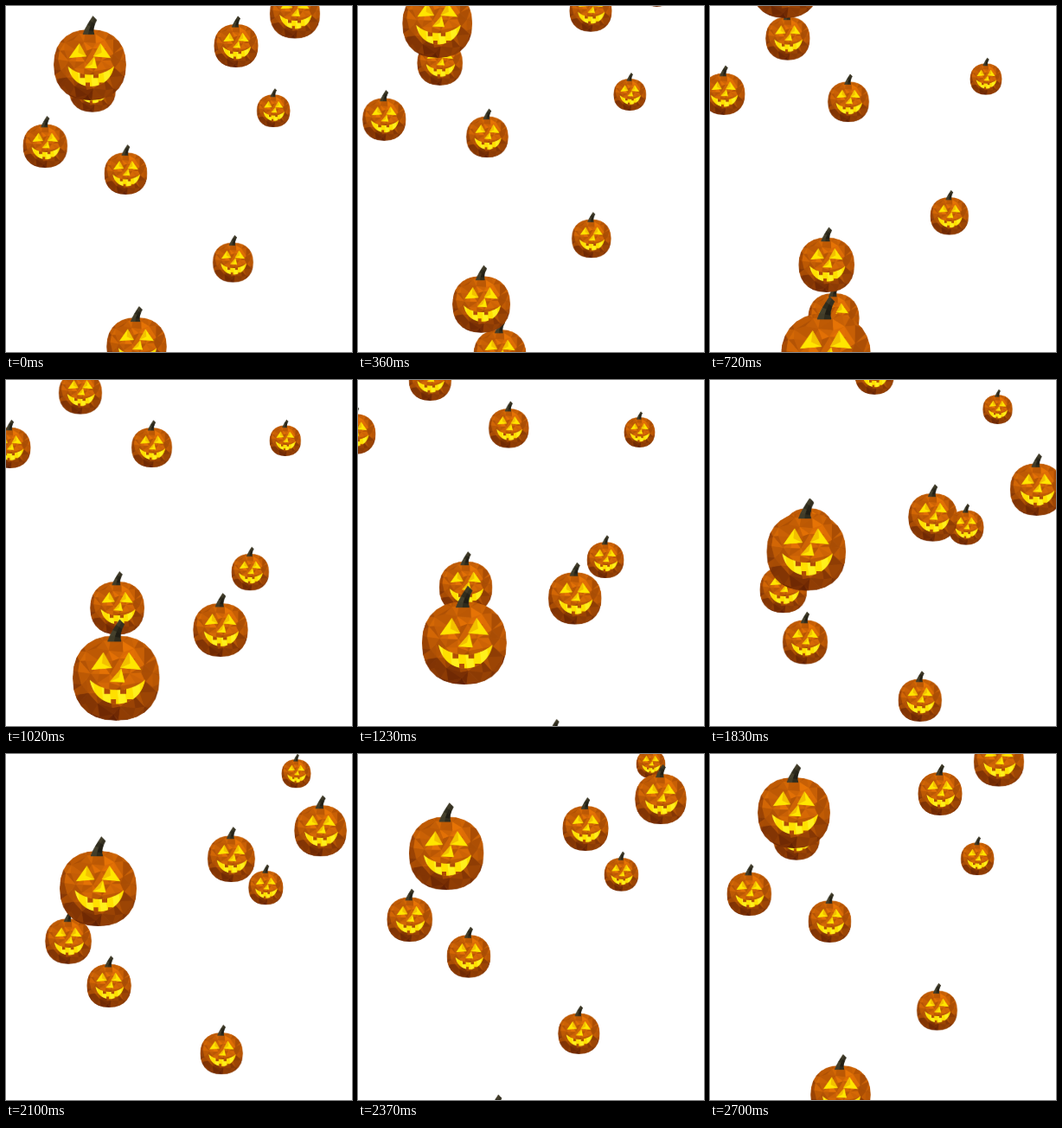
These frames come from a looping animation (400 by 400 pixels, 2.73 s). An HTML page with a canvas:

```html
<!DOCTYPE html>
<html lang="en">
<head>
<meta charset="utf-8">
<title>Rising pumpkins</title>
<style>
html, body { margin: 0; width: 100%; height: 100%; overflow: hidden; background: #fff; }
canvas { display: block; width: 400px; height: 400px; }
</style>
</head>
<body>
<canvas id="stage" width="400" height="400"></canvas>
<script>
const LOOP = 2730, CYCLE = 2700, STEP = 30;
const ctx = document.getElementById('stage').getContext('2d');
ctx.imageSmoothingQuality = 'high';

// A flight runs through two key poses; it may appear at a given time.
const pose = (t, x, y, w) => ({ t, x, y, w });
const flight = (a, b, from = -CYCLE) => ({ a, b, from });
const flights = [
  flight(pose(0, 151, 394, 68), pose(3720, 86, 15, 49)),
  flight(pose(720, 134, 406, 102), pose(2700, 97, 68, 82)),
  flight(pose(720, 143, 361, 58), pose(4140, -11, 47, 46)),
  flight(pose(1830, 110, 303, 51), pose(4140, 180, 34, 45), 1640),
  flight(pose(1440, 233, 407, 51), pose(6840, 328, 51, 34.5)),
  flight(pose(1020, 248, 289, 62), pose(2700, 266, 46, 50), 870),
  flight(pose(1440, 399, 184, 62), pose(2700, 334, 9, 57), 1260)
];

// Straight motion seen in perspective: size falls as 1 / depth.
function poseAt({ a, b }, t) {
  const u = (t - a.t) / (b.t - a.t);
  const ratio = a.w / b.w;
  const depth = 1 + (ratio - 1) * u;
  const s = ratio * u / depth;
  return { x: a.x + (b.x - a.x) * s, y: a.y + (b.y - a.y) * s, w: a.w / depth };
}

// Sprite in units where the body is about 100 wide, centred on the origin.
const SIZE = 320, SCALE = 2;
const sprite = document.createElement('canvas');
sprite.width = sprite.height = SIZE;
const pen = sprite.getContext('2d');
pen.translate(SIZE / 2, SIZE / 2);
pen.scale(SCALE, SCALE);
pen.lineJoin = 'round';

function noise(n) {
  const v = Math.sin(n * 12.9898 + 4.1) * 43758.5453;
  return v - Math.floor(v);
}

function trace(points) {
  pen.beginPath();
  for (const [x, y] of points) pen.lineTo(x, y);
  pen.closePath();
}

function poly(color, points) {
  trace(points);
  pen.fillStyle = pen.strokeStyle = color;
  pen.lineWidth = 0.5;
  pen.fill();
  pen.stroke();
}

const centre = points => [0, 1].map(i => points.reduce((sum, p) => sum + p[i], 0) / points.length);

function skin([x, y], n) {
  const fall = Math.max(0, (y + 10) / 60);
  const light = 0.84 - 0.62 * fall ** 1.5 - 0.2 * (x / 50) ** 2 + (noise(n) - 0.5) * 0.34;
  const k = Math.max(0, Math.min(1, light));
  const mix = (lo, hi) => Math.round(lo + (hi - lo) * k);
  return `rgb(${mix(78, 232)},${mix(20, 116)},${mix(3, 5)})`;
}

function drawBody() {
  const curve = v => Math.sign(v) * Math.abs(v) ** 0.88;
  const rim = Array.from({ length: 28 }, (_, i) => {
    const a = i / 28 * Math.PI * 2;
    return [51 * curve(Math.cos(a)), 50 * curve(Math.sin(a))];
  });
  pen.save();
  trace(rim);
  pen.clip();
  const n = 9, cell = 116 / n;
  const node = (c, r) => {
    const seed = c * 17 + r * 31;
    return [c * cell - 58 + (noise(seed) - 0.5) * 9, r * cell - 58 + (noise(seed + 5) - 0.5) * 9];
  };
  for (let r = 0; r < n; r++) {
    for (let c = 0; c < n; c++) {
      const quad = [node(c, r), node(c + 1, r), node(c + 1, r + 1), node(c, r + 1)];
      const odd = (r + c) % 2;
      for (const half of [0, 2]) {
        const facet = [0, 1, 2].map(i => quad[(i + half + odd) % 4]);
        poly(skin(centre(facet), 200 + (r * n + c) * 2 + half / 2), facet);
      }
    }
  }
  pen.restore();
}

// Tapered stem that bends to the right; each segment has a lit and a dark side.
function drawStem() {
  const parts = 4;
  const across = (s, side) => {
    const half = side * (4 + 4 * (1 - s) ** 2);
    const tilt = s * 0.8;
    return [-2 + 9 * s ** 1.6 + half * Math.cos(tilt), -43 - 23 * s + half * Math.sin(tilt)];
  };
  for (let i = 0; i < parts; i++) {
    const s = i / parts, e = (i + 1) / parts;
    for (const side of [-1, 0]) {
      const tone = 24 + (side ? 16 : 0) + noise(i * 2 + side + 40) * 26;
      poly(`rgb(${tone * 1.08},${tone},${tone * 0.68})`,
        [across(s, side), across(s, side + 1), across(e, side + 1), across(e, side)]);
    }
  }
}

// Yellow triangle with a darker sliver along its last edge.
function glow(points) {
  poly('#ffe600', points);
  poly('#f3c000', [centre(points), points[2], points[0]]);
}

function drawFace() {
  for (const side of [-1, 1]) glow([[15 * side, -30], [29 * side, -10], [5 * side, -12]]);
  glow([[6, -11], [10, 5], [-7, 4]]);

  pen.save();
  pen.beginPath();
  pen.moveTo(-31, 2);
  pen.bezierCurveTo(-14, 18, 16, 18, 34, 2);
  pen.bezierCurveTo(28, 39, -24, 41, -31, 2);
  pen.clip();
  for (let i = 0; i < 8; i++) {
    const x = -36 + i * 9;
    poly(i % 2 ? '#ffe000' : '#fff01c', [[x, 0], [x + 9, 0], [x + 13, 34], [x + 4, 34]]);
  }
  pen.fillStyle = '#b04c06';
  for (const x of [-14, 5]) {
    pen.fillRect(x, 0, 7, 18.5);
    pen.fillRect(x + 8, 25, 6, 9);
  }
  pen.restore();
}

drawBody();
drawStem();
drawFace();

function draw(time) {
  const phase = Math.min(CYCLE, Math.floor((time % LOOP) / STEP) * STEP) % CYCLE;
  const visible = [];
  for (const f of flights) {
    for (let k = -1; k <= 3; k++) {
      const t = phase + k * CYCLE;
      if (t >= f.from) visible.push(poseAt(f, t));
    }
  }
  visible.sort((p, q) => p.w - q.w);
  ctx.fillStyle = '#fff';
  ctx.fillRect(0, 0, 400, 400);
  for (const { x, y, w } of visible) {
    const size = w * SIZE / (100 * SCALE);
    ctx.drawImage(sprite, x - size / 2, y - size / 2, size, size);
  }
}

let start;
function tick(now) {
  start ??= now;
  draw(now - start);
  requestAnimationFrame(tick);
}
draw(0);
requestAnimationFrame(tick);
</script>
</body>
</html>
```
